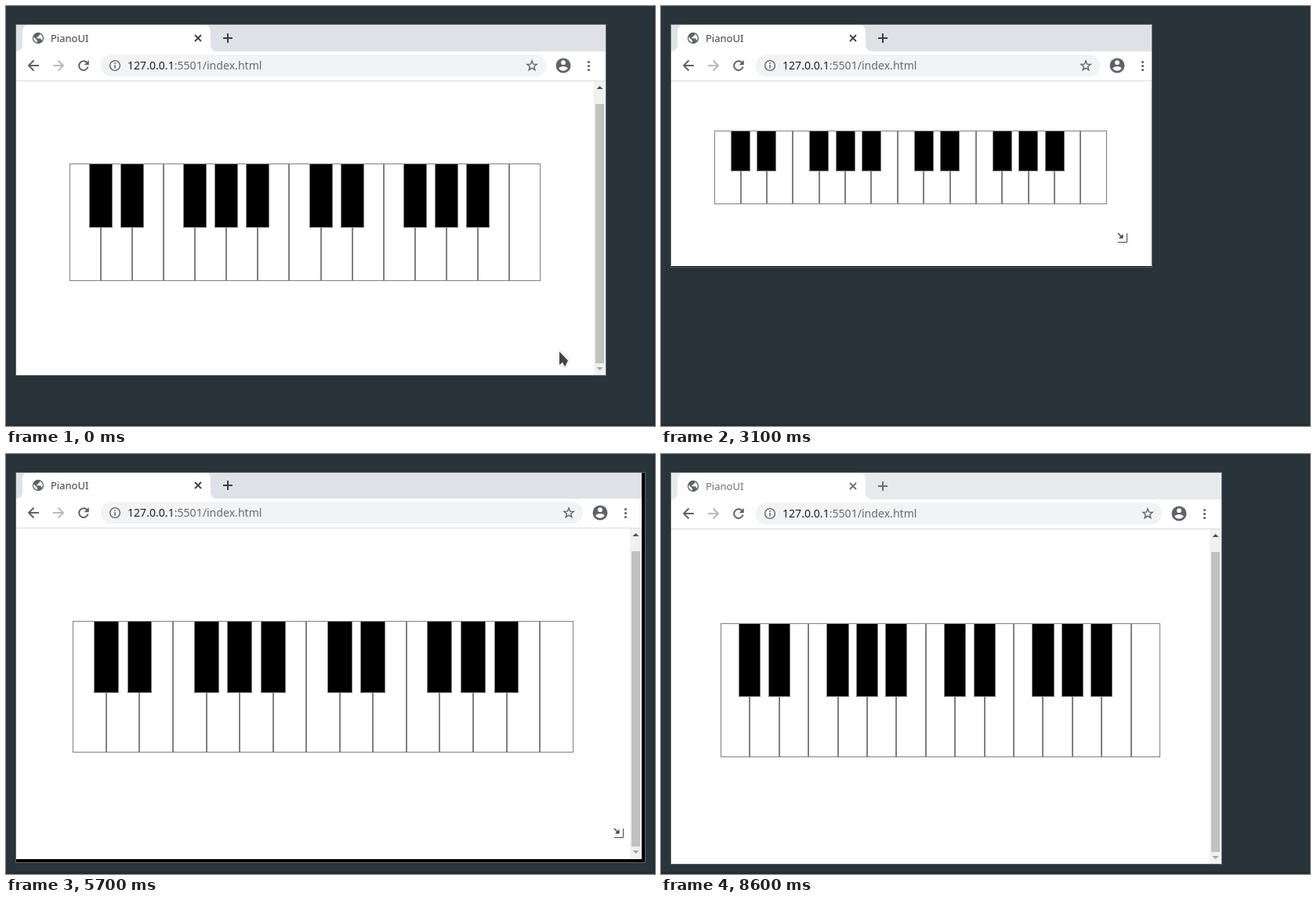
An HTML page with a canvas that plays this animation: 828 px wide and 536 px high, repeating every 8800 ms.

```html
<!DOCTYPE html>
<html lang="en">
<head>
<meta charset="utf-8">
<title>PianoUI</title>
<style>
  html, body { margin: 0; width: 100%; height: 100%; overflow: hidden; background: #29343a; }
  canvas { display: block; }
</style>
</head>
<body>
<canvas id="stage" width="828" height="536"></canvas>
<script>
const ctx = document.getElementById('stage').getContext('2d');
const LOOP = 8800, STEP = 100;
const X0 = 13, Y0 = 24;
const ICON = '#5f6368';

// dragged corner: time, right, bottom
const DRAG = [
  [700, 765, 471], [1000, 759, 467], [1700, 708, 418], [2000, 697, 389],
  [2400, 665, 353], [2500, 665, 353], [2800, 661, 331], [3100, 626, 333],
  [3900, 545, 361], [4300, 561, 379], [5000, 773, 482], [6000, 820, 526],
  [6400, 788, 502], [6600, 780, 500], [7000, 715, 523]
];

const clamp = v => Math.min(1, Math.max(0, v));
const ease = v => v * v * (3 - 2 * v);
const mix = (a, b, k) => a + (b - a) * k;

function slope(i, axis) {
  const a = DRAG[i], b = DRAG[i + 1];
  return a && b ? (b[axis] - a[axis]) / (b[0] - a[0]) : 0;
}

// harmonic mean keeps the curve free of overshoot
function tangent(i, axis) {
  const l = slope(i - 1, axis), r = slope(i, axis);
  return l * r > 0 ? 2 * l * r / (l + r) : 0;
}

function corner(t, axis) {
  let i = 0;
  while (i < DRAG.length - 2 && DRAG[i + 1][0] <= t) i++;
  const a = DRAG[i], b = DRAG[i + 1], h = b[0] - a[0];
  const k = clamp((t - a[0]) / h), n = 1 - k;
  return Math.round(mix(a[axis], b[axis], ease(k)) +
    h * k * n * (n * tangent(i, axis) - k * tangent(i + 1, axis)));
}

// the page is painted one step behind the window
function pose(t) {
  const right = corner(t, 1), bottom = corner(t, 2);
  const lagX = corner(t - STEP, 1) - right, lagY = corner(t - STEP, 2) - bottom;
  return { right, bottom, lagX, lagY, dy: Math.round(lagY * .27) };
}

function rect(x, y, w, h, color) {
  ctx.fillStyle = color;
  ctx.fillRect(x, y, w, h);
}

function disc(x, y, r, color) {
  ctx.fillStyle = color;
  ctx.beginPath();
  ctx.arc(x, y, r, 0, 7);
  ctx.fill();
}

function fill(path, color) {
  ctx.fillStyle = color;
  ctx.fill(new Path2D(path));
}

function line(path, color, width) {
  ctx.strokeStyle = color;
  ctx.lineWidth = width;
  ctx.stroke(new Path2D(path));
}

function at(x, y, draw) {
  ctx.save();
  ctx.translate(x, y);
  draw();
  ctx.restore();
}

function text(str, x, y, size, color) {
  ctx.font = size + 'px "Noto Sans", sans-serif';
  ctx.fillStyle = color;
  ctx.fillText(str, x, y);
}

function globe() {
  disc(0, 0, 7.2, ICON);
  fill('M-5.6-1.5L-2 1.9L-1 3.4V5.7L-4.4 4L-5.9 1Z', '#fff');
  fill('M2-5.5L4.6-3.6L5.8-.4L5.3 2.5H4L3.4 .6L-1.6 .3V-1.4H.2L.4-3L1.9-3.4Z', '#fff');
}

function tabStrip(dy, active) {
  const base = 58 + dy, top = Y0 + dy;
  const ink = active ? '#3c4043' : '#6b6f73';
  rect(X0, Y0, 828, base - Y0, active ? '#dee1e6' : '#e7eaed');
  rect(27, Y0, 228, Math.max(0, dy), '#fff');
  ctx.fillStyle = '#fff';
  ctx.beginPath();
  ctx.moveTo(X0, base);
  ctx.arcTo(21, base, 21, base - 8, 8);
  ctx.arcTo(21, top, 29, top, 8);
  ctx.arcTo(261, top, 261, top + 8, 8);
  ctx.arcTo(261, base, 269, base, 8);
  ctx.fill();
  at(41, 41 + dy, globe);
  text('PianoUI', 57, 46 + dy, 13, ink);
  at(245, 41 + dy, () => line('M-4-4L4 4M4-4L-4 4', ink, 1.8));
  at(283, 41 + dy, () => line('M-6 0H6M0-6V6', ink, 2));
}

function star() {
  ctx.beginPath();
  for (let i = 0; i < 10; i++) {
    const r = i % 2 ? 2.8 : 6.5, a = i * Math.PI / 5 - Math.PI / 2;
    ctx.lineTo(r * Math.cos(a), r * Math.sin(a) + .4);
  }
  ctx.closePath();
  ctx.strokeStyle = ICON;
  ctx.lineWidth = 1.4;
  ctx.stroke();
}

function avatar() {
  disc(0, 0, 9.5, ICON);
  disc(0, -3.8, 2.9, '#fff');
  fill('M-5.7 3.8C-5.7 1.9-1.9 .9 0 .9S5.7 1.9 5.7 3.8Q3.6 6.8 0 6.8T-5.7 3.8Z', '#fff');
}

function toolbar(right, dy) {
  const y = 76 + dy, arrow = 'M7 0H-6M.5-6.5L-6 0L.5 6.5';
  rect(X0, 58 + dy, 828, 38, '#fff');
  rect(X0, 95 + dy, 828, 1, '#dadce0');
  at(35, y, () => line(arrow, ICON, 2));
  at(67, y, () => { ctx.scale(-1, 1); line(arrow, '#b8babd', 2); });
  at(99, y, () => {
    line('M4.4-3.6A5.8 5.8 0 1 0 5.6 1.6', ICON, 2);
    fill('M6.8-7V-.8H.6Z', ICON);
  });

  ctx.fillStyle = '#f1f3f4';
  ctx.beginPath();
  ctx.roundRect(121, y - 14, right - 76 - 121, 28, 14);
  ctx.fill();
  at(139, y, () => {
    line('M6.4 0A6.4 6.4 0 1 1-6.4 0A6.4 6.4 0 1 1 6.4 0', ICON, 1.4);
    rect(-.8, -.8, 1.6, 4.3, ICON);
    rect(-.8, -3.6, 1.6, 1.6, ICON);
  });
  const host = '127.0.0.1';
  text(host, 155, y + 5, 14.1, '#202124');
  text(':5501/index.html', 155 + ctx.measureText(host).width, y + 5, 14.1, '#686c71');

  at(right - 94, y, star);
  at(right - 54, y, avatar);
  for (const d of [-5, 0, 5]) disc(right - 21.5, y + .5 + d, 1.6, ICON);
}

function key(x, y, x2, h, color) {
  rect(x, y, x2 - x, h, '#808080');
  rect(x + 1, y + 1, x2 - x - 2, h - 2, color);
}

function piano(pageRight, top, vh) {
  const pw = pageRight - X0, margin = pw * .1 - 5.9;
  const pitch = (pw - 2 * margin) / 15;
  const y = top + Math.round(vh * .3 - 8);
  const edge = i => Math.round(X0 + margin + i * pitch);
  for (let i = 0; i < 15; i++) key(edge(i), y, edge(i + 1), Math.round(vh * .4), '#fff');
  for (let i = 1; i < 15; i++) {
    // no sharp after E and B
    if (i % 7 === 3 || i % 7 === 0) continue;
    key(edge(i - .375), y, edge(i + .375), Math.floor(vh * .22 + .3), '#000');
  }
}

function scrollbar(x, top, vh) {
  const end = top + vh, track = vh - 30;
  const thumb = Math.round(track * vh / (vh + 16));
  rect(x, top, 15, vh + 2, '#f1f1f1');
  rect(x + 2, end - 15 - thumb, 11, thumb, '#c1c1c1');
  at(x + 7.5, top + 8, () => fill('M-4 2L0-2L4 2Z', '#505050'));
  at(x + 7.5, end - 8, () => fill('M-4-2L0 2L4-2Z', '#a3a3a3'));
}

function browser({ right, bottom, lagX, lagY, dy }, active) {
  rect(12, 23, right - 11, bottom - 22, '#5b6468');
  ctx.save();
  ctx.beginPath();
  ctx.rect(X0, Y0, right - X0, bottom - Y0);
  ctx.clip();
  rect(X0, Y0, 828, 536, '#000');

  const edge = right + lagX, end = bottom + lagY;
  const top = 96 + dy, vh = end - top - (lagY < 0 ? 1 : 0);
  ctx.beginPath();
  ctx.rect(X0, Y0, edge - X0, end - Y0);
  ctx.clip();
  rect(X0, top, 828, end - top, '#fff');
  tabStrip(dy, active);
  toolbar(right + Math.round(lagX * .75), dy);
  piano(edge - 15, top, vh);
  scrollbar(edge - 15, top, vh);
  ctx.restore();
}

function pointer(x, y) {
  const shape = new Path2D('M0 0V17L4 13.8L7 19.5L11 11.5Z');
  at(x, y, () => {
    ctx.shadowColor = 'rgba(0,0,0,.25)';
    ctx.shadowBlur = 3;
    ctx.strokeStyle = '#fff';
    ctx.lineWidth = 1.6;
    ctx.stroke(shape);
    ctx.shadowBlur = 0;
    ctx.fillStyle = '#444';
    ctx.fill(shape);
  });
}

function resizer(x, y) {
  at(x, y, () => {
    ctx.shadowColor = 'rgba(0,0,0,.25)';
    ctx.shadowBlur = 2;
    line('M-.5-12V-.5H-12M-12-12L-6-6', '#fff', 3);
    ctx.shadowBlur = 0;
    line('M-.5-12V-.5H-12', '#444', 1);
    line('M-12-12L-8-8', '#444', 1.4);
    fill('M-5.5-11V-5.5H-11Z', '#444');
  });
}

function cursor(t, { right, bottom, lagX, lagY }) {
  if (t < 600) {
    const k = ease(clamp((t - 100) / 500));
    pointer(mix(706, 735, k), mix(441, 440, k));
  } else if (t < 7600) {
    resizer(right - 28 - Math.round(lagX / 4), bottom - 31 - Math.round(lagY / 10));
  } else if (t < 8600) {
    const k = ease(clamp((t - 7500) / 900));
    pointer(mix(701, 80, k), t < 8500 ? mix(492, 8, k) : -4);
  }
}

function draw(now) {
  const t = Math.floor(now % LOOP / STEP) * STEP, p = pose(t);
  rect(0, 0, 828, 536, '#29343a');
  rect(826, 0, 2, 536, '#262b33');
  rect(0, 533, 828, 3, '#262b33');
  browser(p, t < 8500);
  cursor(t, p);
}

const start = performance.now();
function tick() {
  draw(performance.now() - start);
  requestAnimationFrame(tick);
}
tick();
</script>
</body>
</html>
```
